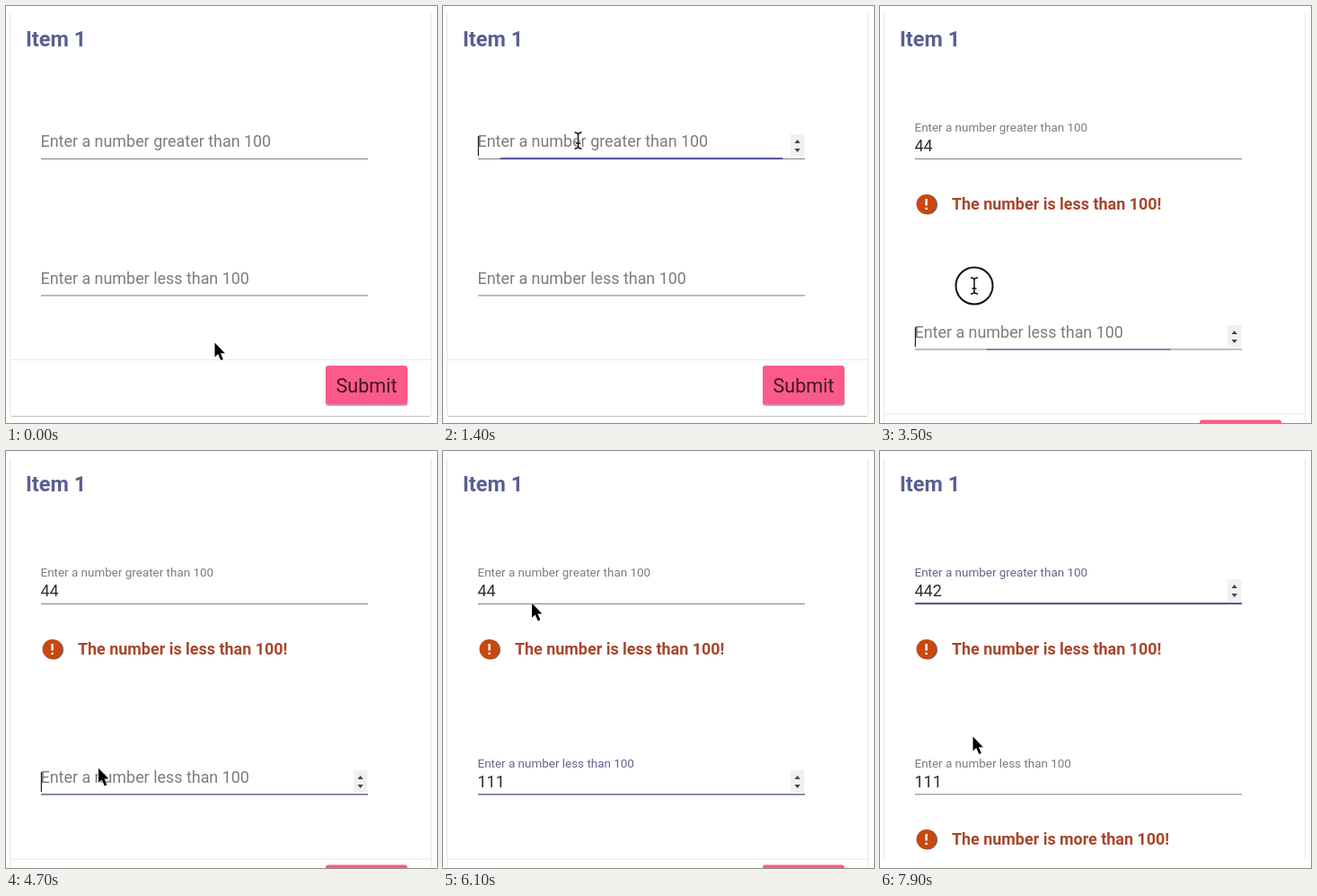
An HTML page for the animation above (8000 ms loop, 480 by 465 pixels).

```html
<!DOCTYPE html>
<html lang="en">
<head>
<meta charset="utf-8">
<style>
  html, body { margin: 0; width: 100%; height: 100%; overflow: hidden; background: #fff; }
  svg { display: block; font: 17.93px Roboto, sans-serif; }
  .label { fill: #7c7c7c; }
  .label.active { fill: #62658c; }
  .value { fill: #2c2c2c; }
  .error { font-weight: 700; fill: #a8452a; }
  .rule { fill: none; stroke: #e8e8e8; }
</style>
</head>
<body>
<svg width="480" height="465" viewBox="0 0 480 465">
  <rect width="480" height="465" fill="#fff"/>
  <path class="rule" d="M4.5 8V455M473.5 8V455"/>
  <text x="22" y="45" font-size="23.5" font-weight="700" fill="#585f92">Item 1</text>
  <g id="fields"></g>
  <g id="errors"></g>
  <g id="footer">
    <path class="rule" d="M4.5 394V455Q4.5 457.5 7 457.5H471Q473.5 457.5 473.5 455V394M5 394.5H473"/>
    <path d="M6 457.5H472" stroke="#bdbdbd"/>
    <rect x="356" y="402.5" width="91.5" height="43.5" rx="3" fill="#b9b9b9"/>
    <rect x="356" y="401" width="91" height="43.5" rx="3" fill="#fb5a8b"/>
    <text x="367.5" y="431" font-size="21.6" fill="#40162a">Submit</text>
  </g>
  <g id="cursor">
    <circle r="20.5" fill="none" stroke="#111" stroke-width="2"/>
    <path id="arrow" d="M0 0V16L3.7 12.6L6.7 19.6L9.4 18.4L6.4 11.7H11.4Z" stroke="#fff" stroke-width="1.2" paint-order="stroke"/>
    <g id="beam" fill="none">
      <path d="M-4 -9Q0 -9 0 -6Q0 -9 4 -9M0 -6V6M-4 9Q0 9 0 6Q0 9 4 9M-2.5 3H2.5" stroke="#fff" stroke-width="3"/>
      <path d="M-4 -9Q0 -9 0 -6Q0 -9 4 -9M0 -6V6M-4 9Q0 9 0 6Q0 9 4 9M-2.5 3H2.5" stroke="#111" stroke-width="1.5"/>
    </g>
  </g>
</svg>
<script>
const LOOP = 8000, FOCUS1 = 1250, FOCUS2 = 3428, REFOCUS = 6650;
const $ = id => document.getElementById(id);
const show = (el, on) => el.setAttribute('visibility', on ? 'visible' : 'hidden');
const move = (el, x, y, scale = 1) => el.setAttribute('transform', `translate(${x} ${y}) scale(${scale})`);
const within = (t, spans) => spans.some(([a, b]) => t >= a && t < b);
const clamp = v => Math.min(1, Math.max(0, v));

// cubic-bezier(.25, .8, .25, 1)
function swift(p) {
  p = clamp(p);
  let lo = 0, hi = 1, s = p;
  for (let i = 0; i < 24; i++) {
    s = (lo + hi) / 2;
    if (.75 * s * (1 - s) + s ** 3 < p) lo = s; else hi = s;
  }
  return 2.4 * s * (1 - s) ** 2 + 3 * s * s * (1 - s) + s ** 3;
}

const fields = [
  { label: 'Enter a number greater than 100', lineY: 170, barY: 169, barH: 2.2, bar: '#575b9d', text: '442',
    keys: [2500, 2700, 7200], focus: [[FOCUS1, FOCUS2], [REFOCUS, LOOP]],
    spin: [[750, FOCUS2], [6500, LOOP]] },
  { label: 'Enter a number less than 100', lineY: 169.4, barY: 169.4, barH: 1.2, bar: '#666a92', text: '111',
    keys: [4900, 5100, 5400], focus: [[FOCUS2, REFOCUS]],
    spin: [[3300, REFOCUS]] }
];

for (const f of fields) {
  $('fields').insertAdjacentHTML('beforeend', `<g>
    <rect x="39" y="${f.lineY}" width="364" height="1" fill="#7f7f7f"/>
    <rect y="${f.barY}" height="${f.barH}" fill="${f.bar}"/>
    <text class="value" x="38.5" y="162"></text>
    <text class="label">${f.label}</text>
    <rect x="39" y="145" width="1.2" height="22" fill="#222"/>
    <g><rect x="387" y="143" width="15.5" height="25" fill="#f2f1f2"/>
    <path d="M391.5 153L394.7 149L397.9 153ZM391.5 159H397.9L394.7 163Z" fill="#444"/></g></g>`);
  f.el = $('fields').lastElementChild;
  [, f.bar, f.value, f.name, f.caret, f.spinner] = f.el.children;
}

const errors = [
  { y: 221, word: 'less', from: FOCUS2 },
  { y: 433, word: 'more', from: REFOCUS }
];
for (const e of errors) {
  $('errors').insertAdjacentHTML('beforeend', `<g transform="translate(52 ${e.y})">
    <circle cx="1" cy=".5" r="11" fill="#666"/><circle cx="-.5" r="11" fill="#c9480f"/>
    <path d="M-.4 -6V1.5M-.4 3.8V6" stroke="#fff" stroke-width="2.4"/>
    <text class="error" x="28" y="6">The number is ${e.word} than 100!</text></g>`);
  e.el = $('errors').lastElementChild;
}

function drawField(f, t) {
  const span = f.focus.find(s => within(t, [s]));
  const typed = f.keys.filter(k => t >= k);
  const float = swift((t - f.keys[0]) / 400);
  move(f.name, 38.5, 156.5 - 16.5 * float, 1 - .25 * float);
  f.name.classList.toggle('active', !!span && typed.length > 0);
  f.value.textContent = f.text.slice(0, typed.length);
  show(f.spinner, within(t, f.spin));
  show(f.bar, span);
  show(f.caret, false);
  if (!span) return;
  const width = 364 * swift((t - span[0]) / 400);
  f.bar.setAttribute('x', 221 - width / 2);
  f.bar.setAttribute('width', width);
  const blink = Math.max(span[0], ...typed);
  show(f.caret, (t - blink) % 1000 < 500);
  f.caret.setAttribute('x', 38.8 + 10.1 * typed.length);
}

// time, x, y of the pointer
const path = [
  [0, 232.5, 375.5], [800, 150, 153], [1100, 150, 153], [1250, 150.5, 150], [2200, 150.5, 150],
  [2600, 153, 157], [2750, 153, 157], [3350, 105, 312], [3850, 105, 312], [4700, 103, 353.8],
  [5500, 103, 353.8], [6100, 99, 169.8], [6450, 99, 157], [7400, 99, 157], [7900, 103.5, 318.5], [LOOP, 103.5, 318.5]
];

function drawCursor(t) {
  const i = path.findIndex(p => p[0] > t);
  const [t0, x0, y0] = path[i - 1], [t1, x1, y1] = path[i];
  const p = (t - t0) / (t1 - t0), e = p * p * (3 - 2 * p);
  move($('cursor'), x0 + (x1 - x0) * e, y0 + (y1 - y0) * e);
  const beam = within(t, [[720, 2900], [3250, 3900], [6350, 7500]]);
  show($('beam'), beam);
  show($('arrow'), !beam);
  show($('cursor').firstElementChild, within(t, [[1240, 1390], [3400, 3600], [6640, 6790]]));
}

function draw(now) {
  const t = now % LOOP;
  for (const f of fields) drawField(f, t);
  for (const e of errors) show(e.el, t >= e.from);
  const shown = errors.filter(e => t >= e.from).length;
  move(fields[1].el, 0, shown ? 213 : 153);
  move($('footer'), 0, 60.5 * shown);
  drawCursor(t);
}

const start = performance.now();
function tick() {
  draw(performance.now() - start);
  requestAnimationFrame(tick);
}
tick();
</script>
</body>
</html>
```
